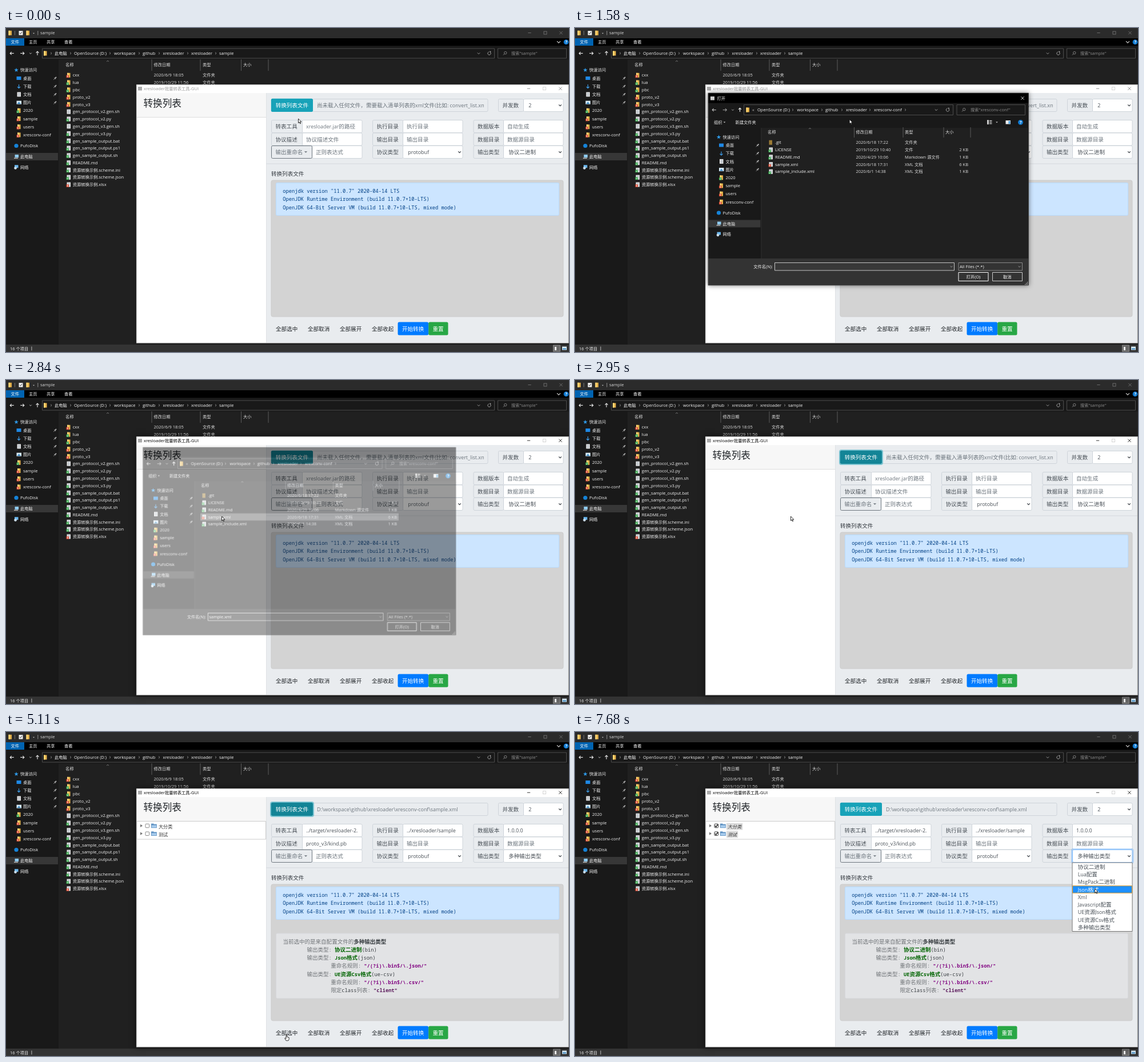
Animation of 985x568 px, one loop 8000 ms. Source, as an HTML page with a canvas:

```html
<!DOCTYPE html>
<html lang="zh-CN">
<head>
<meta charset="utf-8">
<title>xresloader GUI</title>
<style>
html, body { margin: 0; width: 100%; height: 100%; overflow: hidden; background: #191919; }
canvas { display: block; width: 985px; height: 568px; }
</style>
</head>
<body>
<canvas id="stage"></canvas>
<script>
const W = 985, H = 568, LOOP = 8000;
const dpr = window.devicePixelRatio || 1;
const stage = document.getElementById('stage');
const layer = document.createElement('canvas');
for (const c of [stage, layer]) { c.width = W * dpr; c.height = H * dpr; }
const screen = stage.getContext('2d');
const layerCtx = layer.getContext('2d');
let g = screen;

// Text styles: latin size, CJK size, latin family
const SANS = '"Open Sans", "Noto Sans"';
const CJK = '"Noto Sans CJK SC", "Noto Sans CJK", sans-serif';
const UI = [7.5, 7.25, SANS];
const PAGE = [8.93, 9.55, SANS];
const HEAD = [15.6, 16.6, SANS];
const TREE = [7.9, 8.1, SANS];
const MONO = [8.72, 9.53, '"Noto Sans Mono", "DejaVu Sans Mono"'];
const RUNS = /[\u2e80-\u9fff\uff00-\uffef]+|[^\u2e80-\u9fff\uff00-\uffef]+/g;

function text(s, x, y, style, color, font = '', right = false) {
  const runs = s.match(RUNS).map(str => {
    const cjk = str.charCodeAt(0) >= 0x2e80;
    const f = `${font} ${cjk ? style[1] : style[0]}px ${cjk ? '' : style[2] + ', '}${CJK}`;
    g.font = f;
    return { str, f, w: g.measureText(str).width };
  });
  if (right) x -= runs.reduce((sum, r) => sum + r.w, 0);
  g.fillStyle = color;
  for (const r of runs) {
    g.font = r.f;
    g.fillText(r.str, x, y + style[1] * 0.37);
    x += r.w;
  }
  return x;
}

function rect(x, y, w, h, fill) {
  g.fillStyle = fill;
  g.fillRect(x, y, w, h);
}

function box(x1, y1, x2, y2, fill, stroke, r = 0, width = 1) {
  g.beginPath();
  g.roundRect(x1 + 0.5, y1 + 0.5, x2 - x1 - 1, y2 - y1 - 1, r);
  if (fill) { g.fillStyle = fill; g.fill(); }
  if (stroke) { g.lineWidth = width; g.strokeStyle = stroke; g.stroke(); }
}

function ring(x1, y1, x2, y2, color) {
  g.beginPath();
  g.roundRect(x1 - 1, y1 - 1, x2 - x1 + 2, y2 - y1 + 2, 3);
  g.lineWidth = 2;
  g.strokeStyle = color;
  g.stroke();
}

function line(color, width, ...p) {
  g.beginPath();
  for (let i = 0; i < p.length; i += 2) g.lineTo(p[i], p[i + 1]);
  g.strokeStyle = color;
  g.lineWidth = width;
  g.stroke();
}

function poly(color, ...p) {
  g.beginPath();
  for (let i = 0; i < p.length; i += 2) g.lineTo(p[i], p[i + 1]);
  g.closePath();
  g.fillStyle = color;
  g.fill();
}

function disc(x, y, r, color) {
  g.beginPath();
  g.arc(x, y, r, 0, 7);
  g.fillStyle = color;
  g.fill();
}

const down = (x, y, c, s = 2, w = 1) => line(c, w, x - s, y - s / 2, x, y + s / 2, x + s, y - s / 2);
const next = (x, y, c = '#aaa') => line(c, 0.8, x - 1, y - 1.8, x + 1, y, x - 1, y + 1.8);
const caret = (x, y, c, s = 2) => poly(c, x - s, y - s / 2, x + s, y - s / 2, x, y + s / 2);

function cross(x, y, c, s = 2.7) {
  line(c, 0.8, x - s, y - s, x + s, y + s);
  line(c, 0.8, x - s, y + s, x + s, y - s);
}

function winButtons(y, xs, cMin, cMax, cClose) {
  line(cMin, 0.8, xs[0] - 2.7, y, xs[0] + 2.7, y);
  g.strokeStyle = cMax;
  g.strokeRect(xs[1] - 2.5, y - 2.5, 5, 5);
  cross(xs[2], y, cClose);
}

function arrow(x, y, dx, dy, c) {
  const s = 3.3;
  line(c, 1.1, x - dx * s, y - dy * s, x + dx * s, y + dy * s);
  line(c, 1.1, x + dy * 2.5 + dx * 0.8, y + dx * 2.5 + dy * 0.8, x + dx * s, y + dy * s,
    x - dy * 2.5 + dx * 0.8, y - dx * 2.5 + dy * 0.8);
}

function folder(x, y, badge) {
  rect(x - 2.5, y - 4, 5.5, 8, '#e3b04b');
  rect(x - 2.5, y - 4, 2.5, 8, '#ffd977');
  if (badge) mark(x, y, badge);
}

function sheet(x, y, badge) {
  rect(x - 3, y - 4, 6.5, 8, '#e8e8e8');
  for (let i = 0; i < 3; i++) rect(x - 1.5, y - 2.4 + i * 2, 3.8, 0.8, '#8b9aa8');
  if (badge) mark(x, y, badge);
}

function mark(x, y, badge) {
  rect(x - 4, y - 0.2, 4.5, 4.5, badge === 'g' ? '#35a84a' : '#dc4a32');
  if (badge === 'g') line('#fff', 0.8, x - 3.2, y + 2, x - 2, y + 3.2, x - 0.4, y + 0.8);
  else rect(x - 2.2, y + 0.5, 0.9, 3, '#fff');
}

function pin(x, y) {
  line('#b0b0b0', 1.8, x - 0.6, y + 0.6, x + 2, y - 2);
  line('#b0b0b0', 0.8, x - 2.8, y + 2.8, x, y);
  line('#b0b0b0', 0.8, x - 1.8, y - 0.8, x + 0.9, y + 1.9);
}

function refresh(x, y) {
  g.beginPath();
  g.arc(x, y, 2.7, -0.6, 4.6);
  g.strokeStyle = '#aaa';
  g.lineWidth = 0.9;
  g.stroke();
  poly('#aaa', x + 0.5, y - 4, x + 3.2, y - 3.4, x + 1.8, y - 1);
}

function lens(x, y) {
  g.beginPath();
  g.arc(x + 0.8, y - 0.8, 2.2, 0, 7);
  g.strokeStyle = '#999';
  g.lineWidth = 0.8;
  g.stroke();
  line('#999', 0.9, x - 0.8, y + 0.8, x - 3, y + 3);
}

function help(x, y) {
  disc(x, y, 4.4, '#0f7ad2');
  text('?', x - 1.6, y, UI, '#fff', 'bold');
}

function crumbs(list, y) {
  for (const [s, x, sep] of list) {
    text(s, x, y, UI, '#f2f2f2');
    if (sep) next(sep, y);
  }
}

function navPane(dx, dy) {
  const put = (s, x, y) => text(s, x + dx, y + dy, UI, '#f0f0f0');
  rect(dx, 219 + dy, 91, 13, '#373737');
  const star = [];
  for (let i = 0; i < 10; i++) {
    const a = i * Math.PI / 5 - Math.PI / 2, r = i % 2 ? 1.6 : 4;
    star.push(18 + dx + r * Math.cos(a), 73.7 + dy + r * Math.sin(a));
  }
  poly('#2f9bea', ...star);
  put('快速访问', 25, 73.7);
  ['桌面', '下载', '文档', '图片'].forEach((s, i) => {
    put(s, 30, 88 + i * 14.2);
    pin(86 + dx, 88 + i * 14.2 + dy);
  });
  const x = 22.5 + dx;
  rect(x - 4, 85 + dy, 8, 6, '#1e88e5');
  arrow(x, 102.2 + dy, 0, 1, '#3fa0ee');
  sheet(x, 116.4 + dy);
  rect(x - 4, 127.6 + dy, 8.5, 6, '#d9ecf8');
  poly('#3b87c0', x - 3, 133 + dy, x, 129.5 + dy, x + 3.5, 133 + dy);
  ['2020', 'sample', 'users', 'xresconv-conf'].forEach((s, i) => {
    folder(x, 144.8 + i * 14.2 + dy, i ? 'r' : 'g');
    put(s, 30, 144.8 + i * 14.2);
  });
  disc(18 + dx, 206.5 + dy, 3.6, '#1583d8');
  put('PufoDisk', 25, 206.5);
  rect(15.5 + dx, 222 + dy, 6.5, 5, '#8ecbf2');
  rect(14 + dx, 227.6 + dy, 7, 1.4, '#c8c8c8');
  put('此电脑', 25, 225.5);
  rect(15 + dx, 240.2 + dy, 6.5, 5, '#6ab6ec');
  disc(16.5 + dx, 245.6 + dy, 2.4, '#c9dbe8');
  put('网络', 25, 244.2);
}

function headers(list, y, rules, y1, y2) {
  for (const [s, x] of list) text(s, x, y, UI, '#dedede');
  for (const x of rules) rect(x - 0.5, y1, 1, y2 - y1, '#5a5a5a');
}

function explorer() {
  rect(0, 0, W, H, '#202020');
  rect(0, 0, W, 18, '#2b2b2b');
  rect(0, 18, W, 13.5, '#000');
  rect(0, 31.5, W, 24, '#191919');
  rect(0, 55, 92, 500, '#191919');
  folder(7, 8.7);
  line('#888', 0.8, 15.5, 5, 15.5, 12.5);
  box(22, 4.5, 30, 13, '#f0f0f0');
  line('#444', 1, 24, 8.8, 25.5, 10.4, 28, 6.6);
  folder(38, 8.7);
  caret(48.5, 9.5, '#ddd', 1.5);
  line('#aaa', 0.8, 55.8, 5, 55.8, 12.5);
  text('sample', 60, 8.7, UI, '#d8d8d8');
  winButtons(8.5, [916, 943.5, 971], '#7c7c7c', '#7c7c7c', '#7c7c7c');

  rect(0, 18, 32, 13, '#0063b1');
  ['文件', '主页', '共享', '查看'].forEach((s, i) => text(s, [8.5, 40, 71, 102][i], 24.7, UI, '#fff'));
  down(967, 24.7, '#ccc', 3, 1.2);
  help(980, 24.7);

  arrow(10.5, 44.4, -1, 0, '#f0f0f0');
  arrow(28.5, 44.4, 1, 0, '#f0f0f0');
  down(43, 44.5, '#ccc', 1.8);
  arrow(55, 44.4, 0, -1, '#f0f0f0');
  box(63, 35.5, 855, 53.5, '#191919', '#4c4c4c');
  box(860, 35.5, 981, 53.5, '#191919', '#4c4c4c');
  folder(68.5, 44.4);
  next(79, 44.4);
  crumbs([['此电脑', 85, 113], ['OpenSource (D:)', 119, 182], ['workspace', 189, 233], ['github', 239, 268],
    ['xresloader', 274.5, 318], ['xresloader', 324, 367], ['sample', 373, 0]], 44.4);
  down(827, 44.5, '#aaa', 2.2, 0.9);
  refresh(845.5, 44.5);
  lens(873, 44.4);
  text('搜索"sample"', 884, 44.4, UI, '#8c8c8c');

  navPane(0, 0);
  headers([['名称', 104], ['修改日期', 258.5], ['类型', 344], ['大小', 415]], 64.6, [255, 340, 411.5, 459], 55, 75);
  line('#999', 0.7, 176, 59, 178, 57.2, 180, 59);
  const names = ['cxx', 'lua', 'pbc', 'proto_v2', 'proto_v3', 'gen_protocol_v2.gen.sh', 'gen_protocol_v2.py',
    'gen_protocol_v3.gen.sh', 'gen_protocol_v3.py', 'gen_sample_output.bat', 'gen_sample_output.ps1',
    'gen_sample_output.sh', 'README.md', '资源转换示例.scheme.ini', '资源转换示例.scheme.json', '资源转换示例.xlsx'];
  names.forEach((s, i) => {
    const y = 82.8 + i * 12.78;
    (i < 5 ? folder : sheet)(109.5, y, 'rggrr-g-gggggggr'[i].replace('-', ''));
    text(s, 116.8, y, UI, '#f0f0f0');
  });
  ['2020/6/9 18:05', '2019/10/29 11:56'].forEach((s, i) => {
    text(s, 258.5, 82.8 + i * 12.78, UI, '#dcdcdc');
    text('文件夹', 344, 82.8 + i * 12.78, UI, '#dcdcdc');
  });

  rect(0, 555, W, 13, '#333');
  text('16 个项目', 7, 562, UI, '#f0f0f0');
  rect(44.5, 558.5, 0.8, 7, '#ddd');
  box(957, 555.5, 970, 567.5, '#686868', '#8a8a8a');
  rect(960, 559, 3, 6, '#eee');
  rect(973, 558.5, 8, 6, '#d9ecf8');
  rect(974, 561.5, 6, 2, '#3b87c0');
}

const LINE = '#ced4da', GRAY = '#6c757d', INK = '#495057', PALE = '#e9ecef';

function field(x1, mid, x2, y, label, value, filled, select) {
  box(x1, y, mid + 1, y + 23, PALE, LINE, 2);
  box(mid, y, x2, y + 23, '#fff', LINE, 2);
  text(label, x1 + 7.5, y + 11.5, PAGE, INK);
  text(value, mid + (select ? 9.2 : 7), y + 11.5, PAGE, filled ? INK : GRAY);
  if (select) down(x2 - 6, y + 11.5, '#343a40', 2.3, 1.2);
}

function logLine(y, x, ...parts) {
  for (const [s, color, font] of parts) x = text(s, x, y, MONO, color, font);
}

function app(st) {
  g.save();
  g.shadowColor = `rgba(0,0,0,${st.active ? 0.6 : 0.35})`;
  g.shadowBlur = (st.active ? 10 : 5) * dpr;
  rect(228, 99, 756.5, 453.5, '#fff');
  g.restore();

  const tint = st.active ? '#000' : '#999';
  rect(231, 103, 7, 6.5, '#aaa');
  text('xresloader批量转表工具-GUI', 241, 106.4, UI, tint);
  winButtons(106.2, [914.5, 942, 970], st.active ? '#000' : '#777', '#ccc', st.active ? '#000' : '#777');

  rect(229, 114, 226, 42.5, '#f7f7f7');
  rect(229, 156, 226, 1, '#dcdcdc');
  text('转换列表', 240.5, 132, HEAD, '#212529');
  rect(455, 114, 529, 437.5, PALE);
  rect(455, 114, 1, 437.5, '#dfe2e5');
  rect(455, 237.5, 529, 1, '#d6dade');
  box(227.7, 98.7, 984.8, 552.8, null, '#8a8a8a', 0, 0.6);
  if (st.loaded) tree(st.checked);

  box(536, 124, 843.5, 147, PALE, LINE, 2);
  g.save();
  g.beginPath();
  g.rect(537, 124, 299, 23);
  g.clip();
  text(st.loaded ? 'D:\\workspace\\github\\xresloader\\xresconv-conf\\sample.xml'
    : '尚未载入任何文件，需要载入清单列表的xml文件(比如: convert_list.xml)', 544, 135.7, PAGE, GRAY);
  g.restore();
  if (st.ring) ring(464, 124, 537, 147, 'rgba(23,162,184,.5)');
  box(463.3, 123.3, 537.5, 147.5, st.dark ? '#138496' : '#17a2b8', null, 2.5);
  text('转换列表文件', 471.7, 135.7, PAGE, '#fff');
  field(861, 905, 975.5, 124, '并发数', '2', true, true);

  const on = st.loaded;
  field(464, 518, 623.5, 161, '转表工具', on ? '../target/xresloader-2.' : 'xresloader.jar的路径', on);
  field(464, 518, 623.5, 183.5, '协议描述', on ? 'proto_v3/kind.pb' : '协议描述文件', on);
  field(641, 694, 799.5, 161, '执行目录', on ? '../xresloader/sample' : '执行目录', on);
  field(641, 694, 799.5, 183.5, '输出目录', '输出目录', false);
  field(641, 694, 799.5, 206, '协议类型', 'protobuf', true, true);
  field(817.5, 870, 975.5, 161, '数据版本', on ? '1.0.0.0' : '自动生成', on);
  field(817.5, 870, 975.5, 183.5, '数据目录', '数据源目录', false);
  field(817.5, 870, 975.5, 206, '输出类型', on ? '多种输出类型' : '协议二进制', true, true);
  box(535, 206, 623.5, 229, '#fff', LINE, 2);
  text('正则表达式', 542, 217.5, PAGE, GRAY);
  box(464, 206, 536, 229, PALE, GRAY, 2);
  text('输出重命名', 471.5, 217.5, PAGE, GRAY);
  caret(524.5, 217.5, GRAY, 2.7);

  text('转换列表文件', 464, 255.7, PAGE, '#343a40');
  box(463.5, 266.5, 975.5, 506.5, '#d3d3d3', '#cbcbcb', 3);
  box(472, 271, 968, 329, '#cce5ff', '#b8daff', 2);
  ['openjdk version "11.0.7" 2020-04-14 LTS', 'OpenJDK Runtime Environment (build 11.0.7+10-LTS)',
    'OpenJDK 64-Bit Server VM (build 11.0.7+10-LTS, mixed mode)']
    .forEach((s, i) => text(s, 484.3, 285.7 + i * 14.25, MONO, '#004085'));
  if (on) outputInfo();

  if (st.pressed) ring(464, 516, 518, 538, 'rgba(248,249,250,.6)');
  ['全部选中', '全部取消', '全部展开', '全部收起'].forEach((s, i) => text(s, 472 + i * 56, 527.2, PAGE, '#212529'));
  box(685, 515, 739.7, 539, '#007bff', null, 2.5);
  box(738.7, 515, 774, 539, '#28a745', null, 2.5);
  text('开始转换', 693, 527.2, PAGE, '#fff');
  text('重置', 746.5, 527.2, PAGE, '#fff');
  if (st.open) menu(st.item);
}

function tree(checked) {
  box(228.5, 156, 455, 188.5, '#fff', '#ccc');
  ['大分类', '测试'].forEach((s, i) => {
    const y = 164.3 + i * 13.8;
    poly('#777', 235, y - 2.6, 239, y, 235, y + 2.6);
    box(243.5, y - 3.6, 251, y + 3.9, '#fff', checked ? '#333' : '#888', 1);
    if (checked) line('#111', 1.3, 245, y, 246.7, y + 1.9, 250, y - 2.2);
    rect(254, y - 3.7, 4.5, 2, '#5b8fc0');
    rect(254, y - 2.7, 9.8, 6.6, '#5b8fc0');
    rect(254.8, y - 0.9, 8.2, 4, '#a9cdee');
    if (checked) rect(265, y - 4.7, s.length * 8.1 + 4, 12, '#dcdcdc');
    text(s, 267, y + 1.6, TREE, '#333', checked ? 'italic' : '');
  });
}

function outputInfo() {
  box(472, 352.5, 968, 467.5, '#e2e3e5', '#d6d8db', 2);
  const soft = '#707478', ink = '#383d41', key = '#006400', str = '#800080';
  const y = i => 367 + i * 14.27;
  logLine(y(0), 484.5, ['当前选中的是来自配置文件的', soft], ['多种输出类型', ink, 'bold']);
  [['协议二进制', '(bin)', 1], ['Json格式', '(json)', 2], ['UE资源Csv格式', '(ue-csv)', 4]]
    .forEach(([a, b, i]) => logLine(y(i), 526.5, ['输出类型: ', soft], [a, key, 'bold'], [b, ink]));
  logLine(y(3), 568.3, ['重命名规则: ', soft], ['"/(?i)\\.bin$/\\.json/"', str, 'bold']);
  logLine(y(5), 568.3, ['重命名规则: ', soft], ['"/(?i)\\.bin$/\\.csv/"', str, 'bold']);
  logLine(y(6), 568.3, ['限定', soft], ['class', ink], ['列表: ', soft], ['"client"', '#5c1a5c', 'bold']);
}

const ITEM0 = 229.6, ITEM = 13.28;
function menu(item) {
  ring(870, 206, 975.5, 229, 'rgba(0,123,255,.25)');
  box(870, 206, 975.5, 229, null, '#80bdff', 2);
  box(869.5, 228.5, 975.5, 350, '#fff', '#777');
  ['协议二进制', 'Lua配置', 'MsgPack二进制', 'Json格式', 'Xml', 'Javascript配置', 'UE资源Json格式', 'UE资源Csv格式',
    '多种输出类型'].forEach((s, i) => {
    const y = ITEM0 + i * ITEM;
    if (i === item) box(870, y - 0.2, 975, y + ITEM, '#1e90ff', '#e59a1c');
    text(s, 879.7, y + ITEM / 2, PAGE, i === item ? '#fff' : INK);
  });
}

const ROW0 = 194.3, ROW = 12.78;
function dialog(st) {
  rect(233, 114, 560.5, 337, '#191919');
  rect(233, 114, 560.5, 17.5, '#000');
  if (st.blank) {
    rect(233, 131.5, 560.5, 272.5, '#f5f5f5');
    rect(233, 404, 560.5, 47, '#333');
    cross(783, 123, '#fff');
    for (const [x, y, w, h] of [[313, 413, 34, 10], [350, 411, 314, 14], [671, 411, 112, 14], [671, 428, 52, 16],
      [730, 428, 53, 16], [783, 441, 10, 10]]) rect(x, y, w, h, '#fff');
    return;
  }
  if (!st.closing) {
    rect(237, 120, 7, 6.5, '#ccc');
    text('打开', 248.5, 123, UI, '#fff');
    cross(783, 123, '#fff');
  }

  arrow(243.5, 143.6, -1, 0, '#bbb');
  arrow(262, 143.6, 1, 0, '#999');
  down(276, 143.6, '#aaa', 1.8);
  arrow(288.5, 143.6, 0, -1, '#f0f0f0');
  box(295, 134, 662, 153, '#191919', '#4c4c4c');
  box(667.5, 134, 788, 153, '#191919', '#4c4c4c');
  folder(302, 143.5);
  text('«', 310, 143, UI, '#bbb');
  crumbs([['OpenSource (D:)', 319, 381], ['workspace', 388.5, 432], ['github', 438, 467], ['xresloader', 474, 516],
    ['xresconv-conf', 523, 578]], 143.5);
  down(632, 143.6, '#aaa', 2.2, 0.9);
  refresh(652, 143.6);
  lens(680, 143.5);
  text('搜索"xresconv-conf"', 692, 143.5, UI, '#8c8c8c');

  text('组织', 243, 165.3, UI, '#f0f0f0');
  caret(261.5, 165.3, '#ddd', 1.8);
  text('新建文件夹', 280.5, 165.3, UI, '#f0f0f0');
  for (let i = 0; i < 3; i++) {
    rect(721, 161.5 + i * 2.6, 3, 2, '#fff');
    rect(725, 161.9 + i * 2.6, 4.5, 1.2, '#ddd');
  }
  caret(738, 165.3, '#ddd', 1.8);
  rect(753.5, 162, 8.5, 6.5, '#eee');
  rect(758.5, 163, 3, 5, '#4a9fdc');
  help(779.5, 165.3);

  rect(326, 175, 467.5, 229, '#202020');
  rect(325.5, 175, 1, 229, '#303030');
  g.save();
  g.beginPath();
  g.rect(233, 175, 92, 229);
  g.clip();
  navPane(233.5, 117.5);
  g.restore();
  headers([['名称', 337], ['修改日期', 491.5], ['类型', 577], ['大小', 648]], 182.5, [488.5, 574, 645, 692], 174, 192);
  line('#999', 0.7, 409, 177, 411, 175.4, 413, 177);
  const rows = [['.git', '2020/6/18 17:22', '文件夹', ''], ['LICENSE', '2019/10/29 10:40', '文件', '2 KB'],
    ['README.md', '2020/4/29 10:06', 'Markdown 源文件', '1 KB'], ['sample.xml', '2020/6/18 17:31', 'XML 文档', '6 KB'],
    ['sample_include.xml', '2020/6/1 14:38', 'XML 文档', '1 KB']];
  rows.forEach(([name, date, kind, size], i) => {
    const y = ROW0 + (i + 0.5) * ROW;
    const picked = st.picked && i === 3;
    if (picked || i === st.row) rect(336, y - ROW / 2, 355, ROW, picked ? '#626262' : '#4d4d4d');
    i ? sheet(342.5, y, i === 3 ? 'r' : 'g') : rect(339.5, y - 4, 5.5, 8, '#9b7a34');
    text(name, 350, y, UI, '#f4f4f4');
    text(date, 491.5, y, UI, '#dcdcdc');
    text(kind, 577, y, UI, '#dcdcdc');
    if (size) text(size, 688, y, UI, '#dcdcdc', '', true);
  });

  rect(233, 404, 560.5, 47, '#333');
  text('文件名(N):', 346, 418, UI, '#f0f0f0', '', true);
  box(349, 411, 664, 425.5, '#383838', '#c4c4c4');
  box(670.5, 411, 783, 425.5, '#333', '#8a8a8a');
  if (st.picked) text('sample.xml', 351.5, 418, UI, '#fff');
  text('All Files (*.*)', 673, 418, UI, '#f0f0f0');
  down(658.5, 418.3, '#bbb', 1.8, 0.8);
  down(777.5, 418.3, '#bbb', 1.8, 0.8);
  box(670.5, 428, 723.5, 444, '#333', '#fff');
  box(730, 428, 783, 444, '#333', '#ccc');
  text('打开(O)', 684.5, 436, UI, '#fff');
  text('取消', 749, 436, UI, '#fff');
  for (let i = 0; i < 6; i++) rect(791 - [0, 2, 4, 0, 2, 0][i], 449 - [0, 0, 0, 2, 2, 4][i], 1.2, 1.2, '#bbb');
  box(232.5, 113.5, 794, 451.5, null, '#4a4a4a', 0, 0.7);
}

function dialogLayer(st) {
  g = layerCtx;
  g.setTransform(dpr, 0, 0, dpr, 0, 0);
  g.clearRect(0, 0, W, H);
  dialog(st);
  g = screen;
  g.save();
  g.globalAlpha = st.alpha;
  g.translate(513, 282.5);
  g.scale(st.scale, st.scale);
  g.translate(-513, -282.5);
  if (st.alpha === 1) {
    g.shadowColor = 'rgba(0,0,0,.5)';
    g.shadowBlur = 8 * dpr;
  }
  g.drawImage(layer, 0, 0, W, H);
  g.restore();
}

function pointer(x, y, hand) {
  g.beginPath();
  const shape = hand
    ? [-1, 0, 0.4, 0, 0.6, 4, 4, 5, 4.2, 8, 3, 10.5, -1, 10.5, -3.4, 6.4, -2.6, 5.8, -1, 7]
    : [0, 0, 0, 7.6, 1.8, 6, 3, 8.8, 4.2, 8.3, 3, 5.6, 5.3, 5.5];
  for (let i = 0; i < shape.length; i += 2) g.lineTo(x + shape[i], y + shape[i + 1]);
  g.closePath();
  g.fillStyle = '#fff';
  g.fill();
  g.lineWidth = 0.8;
  g.strokeStyle = '#000';
  g.stroke();
}

// The screen is refreshed in bursts: start, end, count
const bursts = [[70, 340, 4], [750, 1180, 5], [1370, 2090, 8], [2200, 2400, 3], [2610, 3360, 8], [3450, 4190, 8],
  [4280, 5000, 8], [5110, 5110, 1], [5410, 6130, 8], [6240, 6740, 6], [6930, 7680, 8]];
const ticks = [0];
for (const [a, b, n] of bursts)
  for (let i = 0; i < n; i++) ticks.push(Math.floor((a + (b - a) * i / Math.max(1, n - 1)) / 10) * 10);

const track = [[0, 511.5, 159], [340, 502, 136.5], [1470, 502, 136.5], [1800, 430, 215], [2090, 380, 251],
  [2200, 379.5, 250], [2400, 377.5, 239], [2930, 377.5, 239], [3360, 395.5, 283.5], [3450, 435, 303],
  [3550, 487, 328.5], [3900, 610, 430], [4190, 660, 511], [4600, 605, 535], [5000, 517, 528], [5110, 491, 530.5],
  [5500, 491, 530.5], [5800, 690, 420], [6130, 882, 290], [6500, 904, 218], [6740, 905, 217.5], [6830, 905, 217.5],
  [7300, 908, 255], [7680, 909.5, 274.5]];

function cursorAt(t) {
  let i = 0;
  while (i < track.length - 2 && t > track[i + 1][0]) i++;
  const [a, b] = [track[i], track[i + 1]];
  const k = Math.min(1, (t - a[0]) / (b[0] - a[0]));
  return [a[1] + (b[1] - a[1]) * k, a[2] + (b[2] - a[2]) * k];
}

function draw(now) {
  const t = ticks.findLast(v => v <= now);
  const [x, y] = cursorAt(t);
  const closing = t >= 2800;
  g.setTransform(dpr, 0, 0, dpr, 0, 0);
  explorer();
  app({
    active: (t >= 750 && t < 1180) || closing,
    loaded: t >= 3030,
    dark: t < 5410 && (t >= 750 || y < 147),
    ring: t >= 2920 && t < 5410,
    checked: t >= 5500,
    pressed: t >= 5410 && t < 6600,
    open: t >= 6600,
    item: y < ITEM0 ? 8 : Math.floor((y - ITEM0) / ITEM)
  });
  if (t >= 1370 && t < 2900) {
    const blank = t < 1450, opening = t < 1550;
    dialogLayer({
      blank, closing,
      alpha: blank ? 0.33 : opening ? 0.85 : closing ? 0.45 : 1,
      scale: blank ? 0.966 : opening ? 0.993 : closing ? 0.977 : 1,
      picked: t >= 2610,
      row: x > 336 && x < 691 ? Math.floor((y - ROW0) / ROW) : -1
    });
  }
  pointer(x, y, y > 516 && y < 538 && (x < 516 || (x > 520 && x < 686)));
}

function frame(now) {
  draw(now % LOOP);
  requestAnimationFrame(frame);
}
draw(0);
requestAnimationFrame(frame);
</script>
</body>
</html>
```
